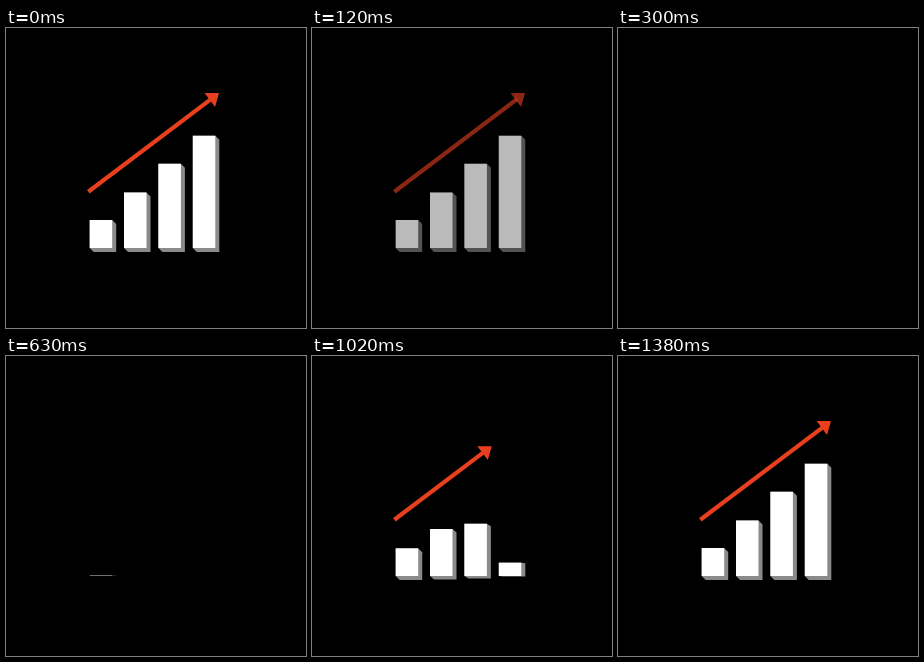
These frames come from a looping animation (300x300 px, 3600 ms). An HTML page with a canvas:

```html
<!DOCTYPE html>
<html lang="en">
<head>
<meta charset="utf-8">
<title>Growth chart</title>
<style>
  html, body { margin: 0; width: 100%; height: 100%; overflow: hidden; background: #000; }
  canvas { display: block; width: 300px; height: 300px; }
</style>
</head>
<body>
<canvas id="stage"></canvas>
<script>
const SIZE = 300, LOOP = 3600, STEP = 30;
const FADE_END = 300, BUILD_END = 1380;
const BASE = 220, BAR_W = 22.5, DEPTH = 4, BAR_MS = 480;
const RED = '#e8401f', WHITE = '#fff', GRAY = '#8a8a8a';

const bars = [
  { x: 83.7, h: 28, start: 601 },
  { x: 118, h: 55.5, start: 727 },
  { x: 152.4, h: 84.2, start: 810 },
  { x: 186.8, h: 112.2, start: 935 }
];
const arrow = { x: 82.3, y: 163.7, dx: 130.7, dy: -98.6, start: 659, ms: 728 };

const canvas = document.getElementById('stage');
const ctx = canvas.getContext('2d');
const dpr = window.devicePixelRatio || 1;
canvas.width = canvas.height = SIZE * dpr;

const clamp = v => Math.min(1, Math.max(0, v));
const easeOut = p => 1 - (1 - p) ** 2;

// Cubic bezier (.33, 0, .33, 1), solved by bisection.
function easeInOut(p) {
  if (p <= 0 || p >= 1) return clamp(p);
  let lo = 0, hi = 1;
  for (let i = 0; i < 24; i++) {
    const u = (lo + hi) / 2;
    const x = 0.99 * u * (1 - u) + u ** 3;
    if (x < p) lo = u; else hi = u;
  }
  return lo * lo * (3 - 2 * lo);
}

function polygon(color, points) {
  ctx.fillStyle = color;
  ctx.beginPath();
  points.forEach(([x, y]) => ctx.lineTo(x, y));
  ctx.fill();
}

function drawBar({ x, h }, scale) {
  if (scale <= 0) return;
  const right = x + BAR_W, top = BASE - h * scale, drop = DEPTH * scale;
  polygon(GRAY, [
    [x, BASE], [x, top], [right, top], [right + DEPTH, top + drop],
    [right + DEPTH, BASE + drop], [x + DEPTH, BASE + drop]
  ]);
  polygon(WHITE, [[x, top], [right, top], [right, BASE], [x, BASE]]);
}

function drawArrow(p) {
  if (p < 0.02) return;
  const full = Math.hypot(arrow.dx, arrow.dy), len = full * p;
  ctx.save();
  ctx.translate(arrow.x, arrow.y);
  ctx.rotate(Math.atan2(arrow.dy, arrow.dx));
  ctx.fillStyle = RED;
  ctx.fillRect(0, -2.1, Math.max(0, len - 10), 4.2);
  polygon(RED, [[len, 0], [len - 11.5, -8.7], [len - 11.5, 8.7]]);
  ctx.restore();
}

function draw(t) {
  ctx.setTransform(dpr, 0, 0, dpr, 0, 0);
  ctx.globalAlpha = 1;
  ctx.fillStyle = '#000';
  ctx.fillRect(0, 0, SIZE, SIZE);

  const whole = t < FADE_END || t >= BUILD_END;
  const progress = (start, ms) => whole ? 1 : clamp((t - start) / ms);
  ctx.globalAlpha = t < FADE_END ? 1 - t / FADE_END : 1;

  bars.forEach(b => drawBar(b, easeInOut(progress(b.start, BAR_MS))));
  drawArrow(easeOut(progress(arrow.start, arrow.ms)));
}

const origin = performance.now();
function frame() {
  const t = (performance.now() - origin) % LOOP;
  draw(Math.floor(t / STEP) * STEP);
  requestAnimationFrame(frame);
}
frame();
</script>
</body>
</html>
```
